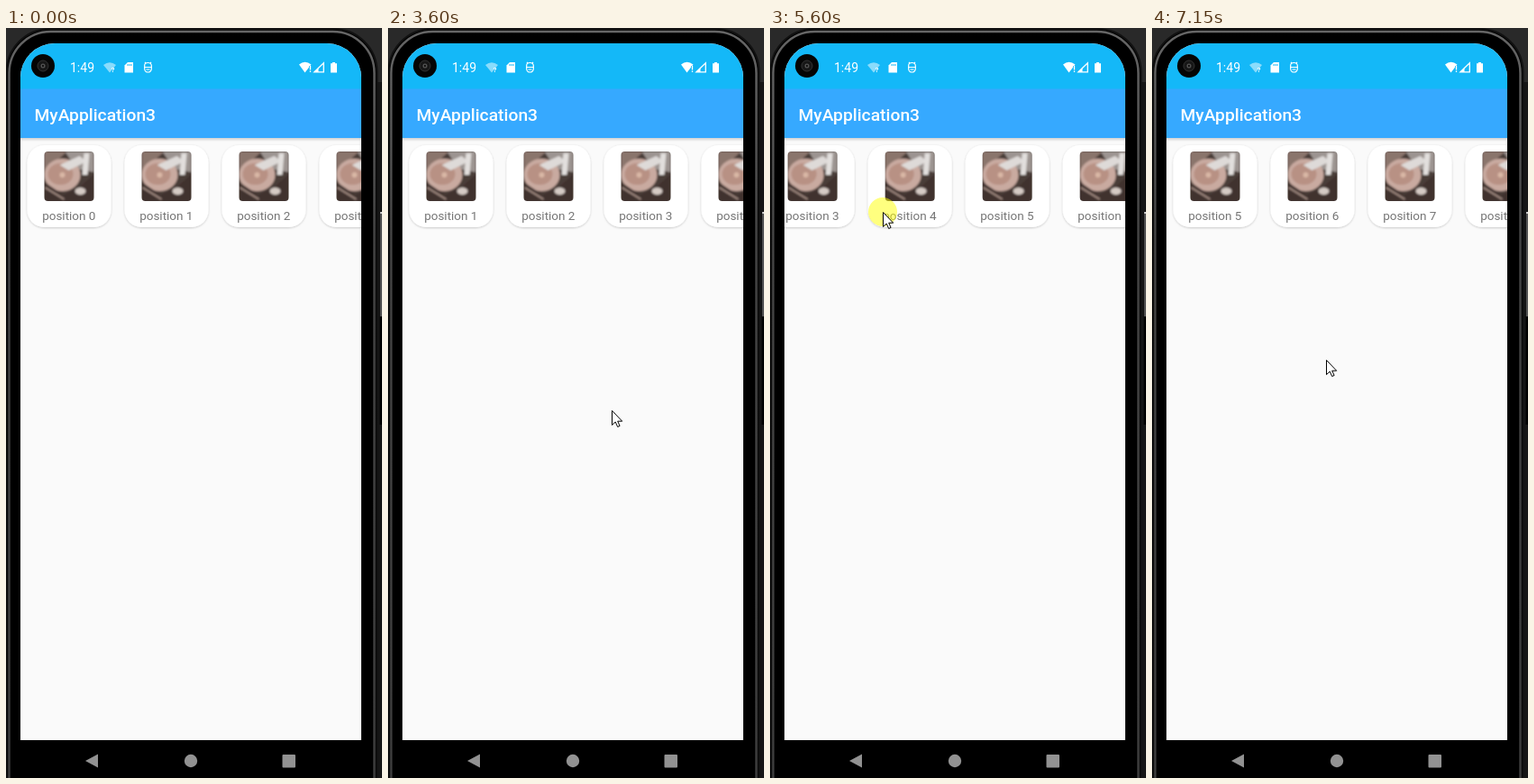
An HTML page that plays this animation: 417 by 832 pixels, repeating every 8000 ms.

```html
<!DOCTYPE html>
<html lang="en">
<head>
<meta charset="utf-8">
<title>Horizontal list</title>
<style>
  html, body { margin: 0; width: 100%; height: 100%; overflow: hidden; background: #000; }
  svg { display: block; width: 417px; height: 832px; font-family: Roboto, sans-serif; }
  .label { font-size: 13.5px; fill: #757575; text-anchor: middle; }
  .title { font-size: 19.25px; font-weight: 500; fill: #fff; }
  .clock { font-size: 14px; fill: #fff; }
</style>
</head>
<body>
<svg viewBox="0 0 417 832">
  <defs>
    <clipPath id="screen"><path d="M16 790V55a38 38 0 0 1 38-38H356a38 38 0 0 1 38 38V790z"/></clipPath>
    <clipPath id="thumb"><rect x="19" y="7" width="55" height="55" rx="4"/></clipPath>
    <filter id="soft" x="-10%" y="-10%" width="120%" height="120%"><feGaussianBlur stdDeviation=".8"/></filter>
    <filter id="shade" x="-10%" y="-10%" width="120%" height="125%">
      <feDropShadow dx="0" dy=".8" stdDeviation="1" flood-opacity=".22"/>
    </filter>
    <linearGradient id="barShade" x2="0" y2="1">
      <stop stop-color="#000" stop-opacity=".16"/><stop offset="1" stop-color="#000" stop-opacity="0"/>
    </linearGradient>
    <linearGradient id="rim" x2="0" y2="1">
      <stop stop-color="#666"/><stop offset=".25" stop-color="#444"/><stop offset="1" stop-color="#3c3c3c"/>
    </linearGradient>
    <g id="card">
      <rect width="93" height="91" rx="19" fill="#fff" filter="url(#shade)"/>
      <g clip-path="url(#thumb)">
        <g filter="url(#soft)">
          <rect x="15" y="3" width="63" height="63" fill="#4a3c39"/>
          <path d="M19 7H44L27 23 19 35z" fill="#8a756c"/>
          <path d="M42 7H74V30L54 26z" fill="#9c9491"/>
          <ellipse cx="39" cy="33" rx="20" ry="18" fill="#c9aaa0"/>
          <ellipse cx="37" cy="32" rx="14" ry="12" fill="#b89184"/>
          <path d="M36 22L58 12 66 18 46 28z" fill="#dedad8"/>
          <path d="M63 9h6l-2 24h-6z" fill="#e2dfdd"/>
          <path d="M19 41L40 55 58 47 74 32V62H19z" fill="#40302d"/>
          <path d="M20 47L41 60" stroke="#a58f85" stroke-width="2"/>
          <ellipse cx="59" cy="51" rx="6" ry="4" fill="#d5cbc5"/>
          <circle cx="39" cy="33" r="3" fill="#d9b7a5"/>
        </g>
      </g>
    </g>
  </defs>

  <rect width="417" height="832" fill="#292929"/>
  <rect x="411" y="60" width="6" height="772" fill="#161616"/>
  <rect x=".5" y="1" width="411" height="900" rx="48" fill="#000" stroke="#111" stroke-width="2"/>
  <rect x="3.5" y="4" width="405" height="900" rx="46" fill="none" stroke="url(#rim)" stroke-width="2.5"/>
  <rect x="7.5" y="8" width="397" height="900" rx="43" fill="#000"/>
  <path d="M416 205V320" stroke="#555" stroke-width="2"/>
  <path d="M416 320V440" stroke="#000" stroke-width="3"/>
  <path d="M415 205h2" stroke="#ccc" stroke-width="2"/>

  <g clip-path="url(#screen)">
    <rect x="16" y="17" width="378" height="773" fill="#fafafa"/>
    <g id="list"></g>
    <rect x="16" y="122" width="378" height="4" fill="url(#barShade)"/>
    <rect x="16" y="17" width="378" height="51" fill="#14b8f8"/>
    <rect x="16" y="67.5" width="378" height="54.5" fill="#36a9ff"/>
  </g>

  <text class="title" x="31.5" y="102.5">MyApplication3</text>
  <text class="clock" x="71" y="49">1:49</text>

  <circle cx="41" cy="42" r="13" fill="#050505"/>
  <circle cx="41" cy="42" r="6" fill="#171717" stroke="#333"/>
  <circle cx="41" cy="42" r="2.5" fill="#555"/>
  <circle cx="41" cy="42" r="1.2" fill="#111"/>

  <g fill="#fff">
    <path d="M108 41Q115 35.500 122 41L115 49.500z" opacity=".5"/>
    <text x="116.500" y="49" font-size="8" font-weight="700">?</text>
    <path d="M135 38h6v11.500h-9.500V41.500z"/>
    <path d="M135 40v2m2-2v2m2-2v2" stroke="#14b8f8"/>
    <path d="M153.700 41.500a3.800 3 0 0 1 7.600 0v4a3.800 3.500 0 0 1-7.600 0zM153 43.500h9M155.500 46h4M154 38l1.500 1.500M161 38l-1.500 1.500" fill="none" stroke="#fff" stroke-width="1.200"/>
    <path d="M325 40.500Q331.500 35 338.500 40.500L331.500 49.500z"/>
    <path d="M337.500 42v4.500m0 1v1.800" stroke="#14b8f8" stroke-width="3"/>
    <path d="M337.500 42v4.500m0 1v1.600" stroke="#fff" stroke-width="1.300"/>
    <path d="M342 48.800L352.300 38.800V48.800z" fill="none" stroke="#fff" stroke-width="1.300"/>
    <path d="M346.500 44.500V49H342z"/>
    <path d="M362 38h3v1.200h2V49.500h-7V39.200h2z"/>
  </g>

  <g fill="#929292">
    <path d="M88 813L102 805.500V820.500z"/>
    <circle cx="205" cy="813" r="7.200"/>
    <rect x="306.500" y="806" width="14.500" height="14.500" rx="1"/>
  </g>

  <g id="pointer">
    <circle id="press" r="16" fill="#ff0" opacity=".5"/>
    <path d="M.5.500V16.500L4.200 13 6.700 18.500 9.100 17.400 6.700 12.200H11.700z" fill="#fff" stroke="#000"/>
  </g>
</svg>
<script>
  const LOOP = 8000, PITCH = 108;
  const byId = id => document.getElementById(id);
  const list = byId('list'), pointer = byId('pointer'), press = byId('press');

  for (let i = 0; i < 10; i++) {
    list.insertAdjacentHTML('beforeend',
      `<g transform="translate(${23.5 + i * PITCH} 130)"><use href="#card"/>` +
      `<text class="label" x="46.300" y="82.800">position ${i}</text></g>`);
  }

  // [time, scroll offset]
  const scroll = [
    [1550, 0], [1680, 16], [1750, 40], [1820, 65], [1890, 84], [1950, 95], [2010, 101.5], [2130, 108],
    [4300, 108], [4360, 118], [4420, 155], [4490, 194], [4550, 214], [4620, 216],
    [5210, 216], [5270, 222], [5600, 346.5], [5700, 380], [5800, 408], [5920, 435],
    [6120, 463.5], [6330, 482], [6580, 490],
    [6840, 490], [6900, 506], [6960, 521], [7020, 532], [7090, 538], [7150, 540]
  ];
  // [time, x, y]
  const path = [
    [60, 407, 808], [119, 407, 808], [120, 410, 729], [260, 410, 729],
    [320, 404, 710], [500, 362, 610], [700, 312, 500], [920, 286, 448],
    [1550, 286, 448], [1700, 276, 434], [1850, 267, 417], [2010, 261, 406], [2130, 258, 402],
    [2320, 258, 402], [2520, 248, 406], [3540, 248, 406], [3600, 248, 424], [3660, 248, 424],
    [3810, 251, 402], [4360, 251, 402], [4550, 249, 411], [4620, 249, 411],
    [4850, 256, 290], [5070, 255, 204], [5210, 255, 204], [5270, 249, 204],
    [5600, 125, 204], [5700, 95, 204], [6050, 84, 204], [6120, 81, 213],
    [6350, 140, 300], [6580, 193, 368]
  ];
  const presses = [[1550, 1750], [4360, 4480], [5210, 5700]];

  // Linear value of column c at time t
  function at(keys, t, c = 1) {
    const n = keys.findIndex(k => k[0] > t);
    if (n === 0) return keys[0][c];
    if (n < 0) return keys[keys.length - 1][c];
    const a = keys[n - 1], b = keys[n];
    return a[c] + (b[c] - a[c]) * (t - a[0]) / (b[0] - a[0]);
  }

  function draw(t) {
    list.setAttribute('transform', `translate(${-at(scroll, t)} 0)`);
    const x = Math.round(at(path, t)), y = Math.round(at(path, t, 2));
    pointer.setAttribute('transform', `translate(${x} ${y})`);
    pointer.style.display = t < 60 ? 'none' : '';
    press.style.display = presses.some(([a, b]) => t >= a && t < b) ? '' : 'none';
  }

  const start = performance.now();
  function tick() {
    draw((performance.now() - start) % LOOP);
    requestAnimationFrame(tick);
  }
  tick();
</script>
</body>
</html>
```
